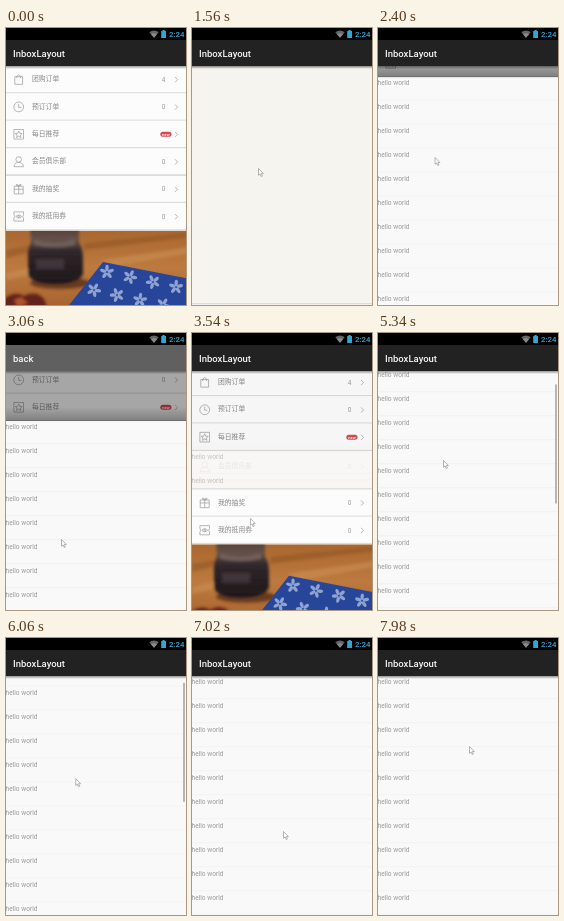
Recreate the animation shown at these times as an HTML page. Size 180 px wide and 277 px high, loop 8 s.

```html
<!DOCTYPE html>
<html lang="zh-CN">
<head>
<meta charset="utf-8">
<title>InboxLayout</title>
<style>
  html, body { margin: 0; width: 100%; height: 100%; overflow: hidden; background: #f6f3ee; }
  svg { display: block; width: 100vw; height: 100vh; }
  text { font-family: Roboto, "Noto Sans", sans-serif; }
  .label { font: 6.8px "Noto Sans CJK SC", "Noto Sans CJK", sans-serif; fill: #868686; }
  .count { font-size: 6.4px; fill: #999; text-anchor: middle; }
  .badge { font-size: 4px; font-weight: 700; fill: #fff; text-anchor: middle; }
  .hello { font-size: 6.6px; fill: #9a9a9a; }
  .title { font-size: 9.5px; font-weight: 500; fill: #f4f4f4; }
  .clock { font-size: 7.8px; font-weight: 500; fill: #2fa6d6; }
  .icon { fill: none; stroke: #9a9a9a; stroke-width: .7; }
</style>
</head>
<body>
<svg viewBox="0 0 180 277" preserveAspectRatio="none">
  <defs>
    <linearGradient id="shade" x2="0" y2="1">
      <stop offset="0" stop-opacity="0"/><stop offset="1" stop-opacity=".24"/>
    </linearGradient>
    <linearGradient id="drop" x2="0" y2="1">
      <stop offset="0" stop-opacity=".4"/><stop offset="1" stop-opacity="0"/>
    </linearGradient>
    <linearGradient id="wood" x2="0" y2="1">
      <stop offset="0" stop-color="#a9672f"/><stop offset=".5" stop-color="#bd7a3f"/><stop offset="1" stop-color="#a8642f"/>
    </linearGradient>
    <linearGradient id="jar" x2="0" y2="1">
      <stop offset="0" stop-color="#4a342c"/><stop offset=".25" stop-color="#65534b"/>
      <stop offset=".45" stop-color="#30262a"/><stop offset="1" stop-color="#1d1719"/>
    </linearGradient>
    <filter id="soft"><feGaussianBlur stdDeviation="1.6"/></filter>
    <filter id="haze"><feGaussianBlur stdDeviation=".7"/></filter>
    <clipPath id="photoClip"><rect y="202.5" width="180" height="75"/></clipPath>
  </defs>

  <rect width="180" height="277" fill="#f6f3ee"/>
  <g id="mid"></g>
  <rect id="cover" y="38" width="180" height="239" fill="#f6f4ef"/>
  <g id="list"></g>
  <g id="upper"></g>
  <g id="lower">
    <g clip-path="url(#photoClip)">
      <rect y="202" width="180" height="76" fill="url(#wood)"/>
      <g filter="url(#soft)">
        <path d="M0 222L24 218V224L0 230ZM78 215L185 204V209L78 222Z" fill="#8f5323" opacity=".55"/>
        <path d="M95 232L185 219V225L110 238ZM0 245L24 240V247L0 252Z" fill="#d0935a" opacity=".5"/>
        <ellipse cx="54" cy="255" rx="30" ry="6" fill="#4a2614" opacity=".7"/>
        <path d="M24 196H73L73 215Q77 220 77 230V246Q73 256 49 256Q25 256 22 246V230Q21 221 25 215Z" fill="url(#jar)"/>
        <path d="M28 212Q48 217 69 212V217Q48 222 28 217Z" fill="#8c7a70" opacity=".55"/>
        <path d="M30 231H58V241H30Z" fill="#4a3d42" opacity=".7"/>
        <path d="M-3 272Q8 262 18 268Q30 262 38 271L42 281H-3Z" fill="#64201a"/>
        <path d="M8 272L15 269L22 275L12 279Z" fill="#b0522c"/>
      </g>
      <g filter="url(#haze)">
        <path d="M60 281L97 234L184 251V281Z" fill="#27469a"/>
        <g id="cloth" fill="#a9bade" opacity=".8"></g>
      </g>
    </g>
  </g>
  <g id="dim">
    <rect y="38" width="180" height="82" fill-opacity=".34"/>
    <rect y="106" width="180" height="14" fill="url(#shade)"/>
  </g>
  <rect id="bar" x="177" width="2" height="119" fill="#b5b5b5"/>

  <rect y="38" width="180" height="3" fill="url(#drop)"/>
  <rect id="head" y="12" width="180" height="26"/>
  <text id="title" class="title" x="7" y="29"></text>
  <rect width="180" height="12" fill="#000"/>
  <path d="M143.3 4.2Q148 1 152.7 4.2L148 9.8Z" fill="#666"/>
  <path d="M145 6.2Q148 4.5 151 6.2L148 9.8Z" fill="#8a8a8a"/>
  <path d="M155.2 3H156.5V2H158.7V3H160V10H155.2Z" fill="#2fa6d6"/>
  <text class="clock" x="163" y="9">2:24</text>
  <path id="cursor" d="M0 0V6.8L1.6 5.4L2.7 8L3.9 7.5L2.8 5H4.8Z" fill="#fff" stroke="#8c8c8c" stroke-width=".65"/>
</svg>
<script>
const LOOP = 8000, STEP = 60, ROW = 27.4, TOP = 38;
const $ = id => document.getElementById(id);

const icons = [
  '<path d="M1.6 2.6H9.4V10.3H1.6ZM3.6 4.2V2.2Q5.5 -.8 7.4 2.2V4.2"/>',
  '<circle cx="5.5" cy="5.5" r="4.9"/><path d="M5.5 2.5V6H8.2"/>',
  '<path d="M.7 .7H10.3V10.3H.7ZM5.5 2.2L6.5 4.5L9 4.7L7.1 6.3L7.7 8.7L5.5 7.4L3.3 8.7L3.9 6.3L2 4.7L4.5 4.5Z"/>',
  '<circle cx="5.5" cy="3.3" r="2.8"/><path d="M.8 10.5Q1 6.2 5.5 6.2T10.2 10.5Z"/>',
  '<path d="M1 2.6H10V10.3H1ZM1 5.6H10M5.5 2.6V10.3M5.5 2.6Q2.4 2.6 3.2 .8Q4.6 .1 5.5 2.6Q6.4 .1 7.8 .8Q8.6 2.6 5.5 2.6"/>',
  '<path d="M.7 .9H10.3V3.6Q8.8 5.5 10.3 7.4V10.1H.7V7.4Q2.2 5.5 .7 3.6Z"/><path d="M2.6 5.5Q5.5 2.4 8.4 5.5Q5.5 8.6 2.6 5.5Z"/><circle cx="5.5" cy="5.5" r=".9"/>'
];
const labels = ['团购订单', '预订订单', '每日推荐', '会员俱乐部', '我的抽奖', '我的抵用券'];

function row(i) {
  const y = TOP + i * ROW;
  const mark = i === 2
    ? '<rect x="154.3" y="11" width="11.2" height="5" rx="2.5" fill="#d64a50"/><text class="badge" x="160" y="14.9">new</text>'
    : `<text class="count" x="157.6" y="15.8">${i ? 0 : 4}</text>`;
  return `<g transform="translate(0 ${y})">
    <rect width="180" height="${ROW + .1}" fill="#fcfcfc"/>
    <rect y="${ROW - 1.2}" width="180" height="1.2" fill="#dddcdb"/>
    <g class="icon" transform="translate(7.2 8)">${icons[i]}</g>
    <text class="label" x="26" y="15.2">${labels[i]}</text>${mark}
    <path class="icon" d="M169 11.1L171.6 13.7L169 16.3"/></g>`;
}

$('upper').innerHTML = [0, 1, 2].map(row).join('');
$('mid').innerHTML = row(3);
$('lower').insertAdjacentHTML('beforeend',
  [4, 5].map(row).join('') + '<rect y="146.6" width="180" height="1.1" fill="#d8d6d4"/>');

let rows = '<rect width="180" height="520" fill="#f9f9f9"/>';
for (let i = 0; i < 20; i++)
  rows += `<text class="hello" x="-.5" y="${i * 24 + 8}">hello world</text>
    <rect y="${i * 24 + 22.4}" width="180" height=".8" fill="#f0f0f0"/>`;
$('list').innerHTML = `<g id="rows">${rows}</g>`;

// Five-petal blossoms in two slanted rows.
let petals = '';
for (let i = 0; i < 8; i++) {
  const x = 101 + i % 4 * 23 - (i > 3 ? 13 : 0), y = 244 + i % 4 * 5 + (i > 3 ? 18 : 0);
  for (let k = 0; k < 5; k++)
    petals += `<ellipse cx="${x}" cy="${y - 4}" rx="1.7" ry="3.2" transform="rotate(${k * 72 + i * 25} ${x} ${y})"/>`;
}
$('cloth').innerHTML = petals;

// Tracks hold time, value pairs.
const xs = [360, 157, 600, 65, 900, 65, 960, 66, 1800, 66, 2100, 57, 3060, 55, 3240, 55,
  4020, 64, 4080, 63, 4860, 63, 5340, 65, 6300, 70, 7020, 91];
const ys = [360, 40, 600, 140, 1800, 140, 2100, 107, 3060, 206, 3240, 206, 4020, 141, 4860, 141,
  5040, 153, 5340, 127, 5760, 85, 6180, 153, 6480, 153, 6780, 193, 7020, 193, 7500, 230, 7680, 230, 7980, 108];
const pulls = [2100, 0, 3060, 50, 3600, 50, 3601, 0, 6480, 0, 6780, 22, 7020, 0, 7500, 18, 7680, 18, 7960, 0];
const scrolls = [5040, 0, 5340, 26, 5760, 68, 6180, 0];

const clamp = v => Math.max(0, Math.min(1, v));
const ease = v => (1 - Math.cos(Math.PI * clamp(v))) / 2;

function at(track, t) {
  if (t <= track[0]) return track[1];
  for (let i = 2; i < track.length; i += 2)
    if (t <= track[i]) {
      const [t0, a, t1, b] = track.slice(i - 2, i + 2);
      return a + (b - a) * ease((t - t0) / (t1 - t0));
    }
  return track[track.length - 1];
}

function openness(t) {
  if (t < 3240) return ease((t - 1246) / 340);
  if (t < 4300) return 1 - ease((t - 3240) / 360);
  return ease((t - 4306) / 340);
}

const move = (id, x, y) => $(id).setAttribute('transform', `translate(${x} ${y})`);
const fade = (id, v) => $(id).setAttribute('opacity', v);

function draw(t) {
  let p = openness(t);
  if (p < .01) p = 0;
  const pull = at(pulls, t), scroll = at(scrolls, t);
  const listed = (t >= 1620 && t < 3600) || t >= 4680;
  const up = (pull - 82) * p;
  const back = pull > 38 && t < 3240;

  move('upper', 0, up);
  move('dim', 0, up);
  move('lower', 0, 130.5 * p);
  move('list', 0, 120 + up);
  move('rows', 0, -scroll);
  fade('cover', clamp(p * 10));
  fade('list', listed ? clamp(p * 8) : 0);
  fade('dim', listed ? p : 0);

  $('bar').setAttribute('y', TOP + scroll * 239 / 480 + .5);
  fade('bar', t >= 5040 ? clamp((6500 - t) / 240) : 0);
  $('head').setAttribute('fill', back ? '#606060' : '#222');
  $('title').textContent = back ? 'back' : 'InboxLayout';
  fade('cursor', t < 360 ? 0 : 1);
  move('cursor', at(xs, t) + .5, at(ys, t) + .5);
}

const start = performance.now();
function tick() {
  const t = (performance.now() - start) % LOOP;
  draw(Math.floor(t / STEP) * STEP);
  requestAnimationFrame(tick);
}
tick();
</script>
</body>
</html>
```
